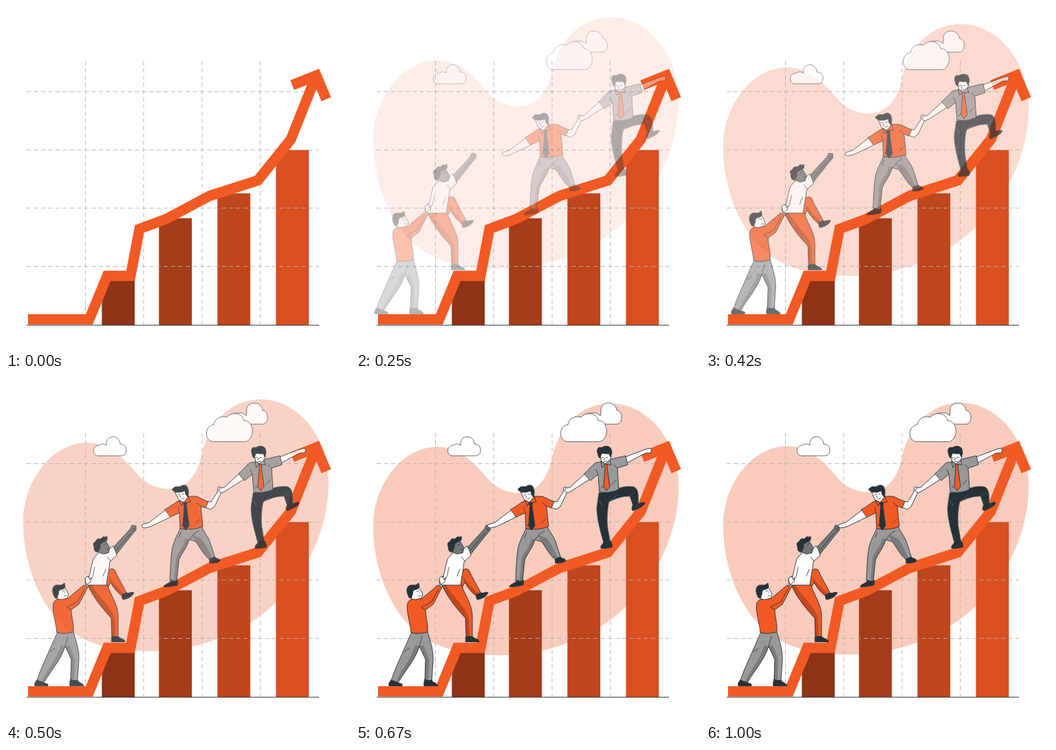
An HTML page that plays this animation: 500x500 px, repeating every 1040 ms.

```html
<!DOCTYPE html>
<html lang="en">
<head>
<meta charset="utf-8">
<title>Climbing the growth chart</title>
<style>
  html, body { margin: 0; width: 100%; height: 100%; overflow: hidden; background: #fff; }
  svg { display: block; width: 100%; height: 100%; }
  .ink { stroke: #263238; stroke-width: .9; stroke-linejoin: round; stroke-linecap: round; }
  .o { fill: #f15a24; }
  .g { fill: #999; }
  .w { fill: #fff; }
  .d { fill: #263238; }
  .s { fill: #737678; }
  .n { fill: none; stroke-width: .8; }
  .sh { fill: #000; fill-opacity: .2; stroke: none; }
  .m { stroke: #6b767b; stroke-width: .6; }
</style>
</head>
<body>
<svg viewBox="0 0 500 500">
  <path id="blob" fill="#f9cbbc" d="M25 218C25 157 67 102 118 102C150 102 172 125 192 149C205 163 220 169 236 169C262 169 277 150 284 122C293 75 325 39 370 39C425 39 469 95 469 158C469 228 438 287 398 328C353 377 280 405 212 405C160 405 107 397 72 356C42 321 25 268 25 218Z"/>

  <g id="clouds" class="ink w" style="stroke-width:.7">
    <path d="M141 113C133 112 133 98 143 98C146 95 152 95 154 98C152 82 173 81 174 96C185 95 186 112 177 113Z"/>
    <path d="M340 67C328 65 333 49 346 51C351 50 355 52 357 55L358 49C355 33 380 32 381 47C391 48 390 66 382 67Z"/>
    <path d="M309 92.5C296 92 296 69 310 68C311 59 321 54 329 57C337 48 352 51 354 62C369 61 371 90 356 92.5Z"/>
  </g>

  <path fill="#8f3318" d="M139.300 396h47.800v68h-47.800z"/>
  <path fill="#a63c19" d="M222.300 308.500h47.800V464h-47.800z"/>
  <path fill="#c0461e" d="M307.300 272.200h47.800V464h-47.800z"/>
  <path fill="#d84f20" d="M392.400 209.200h47.800V464h-47.800z"/>
  <path fill="none" stroke="#b3b3b3" stroke-width=".9" stroke-dasharray="6 4.500" d="M30 124.500H455M30 209.200H455M30 293.800H455M30 378.500H455M115.500 80V463M200 80V463M285 80V463M369.500 80V463"/>
  <path stroke="#263238" d="M30 464H455"/>
  <path fill="none" stroke="#f15a24" stroke-width="15" stroke-miterlimit="6" d="M32 455.500H121L147 392.200H181L194 324L233 309.500L296 276L366 253.500L414 194L449 106M416 115L451 101L465.500 135.500"/>

  <g id="left" class="ink">
    <!-- helper at the bottom -->
    <path class="g" d="M83 370L106 369C110 382 115 398 114 410L112 440H102L103 409L94 390C88 410 74 424 63 443L53 440C58 424 66 408 71 396Z"/>
    <path class="sh" d="M94 390L103 409L102 439H107L108 409L100 388ZM94 390C88 410 74 424 63 443L59 442C70 421 82 408 88 388Z"/>
    <path class="n" d="M94 390L98 376M72 398L79 393"/>
    <path class="d" d="M53 439L61 442L69 445V447.500H50C49 444 51 441 53 439ZM102 438C105 440 108 440 112 439C113 443 120 443 121 447.500H101C100 444 101 441 102 438Z"/>
    <path class="w" d="M124 302L123 295L126 289L129 288L131 291L133 291L131 299L127 304Z"/>
    <path class="o" d="M80 323L87 320L97 321L121 301L127 304L114 329L103 337C103 348 107 356 106 369Q94 373 82 370C81 355 74 338 77 327Z"/>
    <path class="n" d="M97 333L112 325L122 307M97 333L103 337"/>
    <path class="w" d="M83 321L82 310L93 304L97 310L99 315L97 320L89 322Z"/>
    <path class="d" d="M79 319C75 312 74 303 81 301L89 301L93 298L94 304C92 308 87 307 85 309L84 315L82 320Z"/>
    <path class="n" d="M90 310l3-.8M93 317l3-.5M94 311v.8"/>

    <!-- climber -->
    <path class="o" d="M150 301L154 284Q160 274 166 279C171 291 178 301 183 312L177 317C169 311 164 304 160 297L156 305Z"/>
    <path class="sh" d="M159 296L157 287L166 300L180 314L177 317C169 311 164 304 160 297Z"/>
    <path class="o" d="M127 301L155 300C160 315 171 330 171 345V377H162L161 349C150 337 136 321 127 301Z"/>
    <path class="sh" d="M127 301L133 301C141 316 164 335 166 350L167 377H162L161 349C150 337 136 321 127 301Z"/>
    <path class="d" d="M162 376L171 375.500C173 379 181 379 181 383.500H161.500ZM177 315L183 312C187 314 190 310 194 312C192 317 186 321 178 322C176 319 177 317 177 315Z"/>
    <path class="s" d="M161 248L166 244L189 219L191 214L197 215L197 221L191 228L168 257Z"/>
    <path class="n" d="M168 251L189 226M192 219l3-1M192 222l3-1"/>
    <path class="w" d="M143 254L152 255L163 244C166 248 168 253 169 258L159 267C158 280 155 290 154 301H125C130 289 131 276 135 263Z"/>
    <path class="n" d="M155 260L160 266M137 275L134 289L128 297M153 278L149 288"/>
    <path class="s" d="M142 251L143 241L153 237L159 247L157 254L149 256Z"/>
    <path class="d" d="M138 252C135 249 137 245 135 242C135 238 139 239 140 235C143 232 145 236 148 232C150 229 152 233 155 230C155 233 156 236 153 237C149 237 149 240 145 241L145 246L142 253Z"/>
    <path class="n" d="M150 243l3-2M154 250l3-2"/>
    <path class="w" d="M124 297L123 291L127 288L130 293L132 290L131 296L126 300Z"/>
  </g>

  <g id="right" class="ink">
    <!-- man offering his hand -->
    <path class="g" d="M245 219L276 216C280 224 285 230 288 237L296 262L289 265C280 258 275 248 268 238L258 235C255 248 244 258 243 267L240 296L230 294C231 278 231 261 234 245C237 235 241 228 245 219Z"/>
    <path class="sh" d="M258 235C255 248 244 258 243 267L240 296L236 295L239 262C243 250 252 244 253 233ZM262 228L275 233C282 241 287 251 292 264L289 265C280 258 275 248 268 238Z"/>
    <path class="n" d="M258 235L266 226L272 222M246 224L243 232"/>
    <path class="d" d="M232 294C236 296 239 296 242 294L241 301C235 302 229 304 221 303.500C222 299 230 299 232 294ZM288 263L295 260C298 263 303 262 303 266C298 269 293 269 288 269Z"/>
    <path class="w" d="M225 191L200 210L190 213L189 216L193 218L202 216L231 202ZM283 179L290 180L299 166L300 159L303 158L308 163L304 168L295 187L289 191L282 188Z"/>
    <path class="o" d="M223 191C231 187 237 181 244 178L252 175L258 172L269 172L286 180L282 189L275 186L278 216Q262 222 245 219L244 196L231 202Z"/>
    <path class="n" d="M244 196L242 188M275 186L269 181M274 205L268 211M247 214l5-3"/>
    <path class="d" d="M248 180L255 180L254 185L258 215L253 221L249 215L251 186Z"/>
    <path class="w" d="M238 166L243 163L254 163L257 171L256 177L250 181L243 177Z"/>
    <path class="o" d="M244 178L250 181L247 186ZM250 181L257 172L260 180Z"/>
    <path class="d" d="M234 161L238 158L245 158C249 154 256 156 256 160C258 165 257 169 256 173L253 169L252 164L246 166L238 166L234 163Z"/>
    <path class="n" d="M242 170l2.500-.6M248 169l2.500-.8M245 171l.5 3M247 176l4-1.500"/>

    <!-- leader -->
    <path class="d m" d="M351 167L380 160C388 157 397 157 402 158C410 162 408 172 409 183L401 187L396 172C385 172 376 175 366 180C363 192 363 208 364 217L368 240H358C353 223 347 201 348 187Z"/>
    <path class="n m" d="M366 180L378 170M352 178L356 186M396 172L402 167"/>
    <path class="d" d="M358 239L368 237C370 240 371 243 370 246C364 247 360 248 354 247.500C353 243 357 242 358 239ZM400 186L407 182C411 184 414 179 418 181.500C417 186 408 190 401 193C398 192 399 188 400 186Z"/>
    <path class="w" d="M332 138L309 159L303 160L301 164L305 167L310 165L338 147ZM389 115L418 104L425 102L428 104L426 109L419 109L391 124Z"/>
    <path class="g" d="M330 139C337 133 342 126 347 123L355 122L369 118L390 113L393 126L378 131L380 162Q367 168 352 166L350 140L339 149Z"/>
    <path class="n" d="M350 140L347 133M378 131L373 126M376 148L370 155M354 160l5-4"/>
    <path class="w" d="M353 110L366 109L369 115L366 122L360 125L355 121Z"/>
    <path class="o" d="M358 125L364 124L363 129L367 158L362 164L358 158L360 130Z"/>
    <path class="g" d="M354 121L360 125L356 130ZM360 125L367 119L369 126Z"/>
    <path class="d" d="M351 115C349 109 347 104 351 101L356 101C361 97 369 100 369 104C371 109 369 112 368 115L366 110L360 110L355 109L353 116Z"/>
    <path class="n" d="M355 116l2.500-.5M361 116l2.500-.7M359 116.500l-.5 3M358 122l4-1"/>
  </g>
</svg>
<script>
  const LOOP = 1040, START = 70, SETTLED = 570;
  const move = { blob: [0, 1], clouds: [1, 0], left: [1, 0], right: [-1, 0] };
  const clamp = x => Math.min(1, Math.max(0, x));

  function draw(t) {
    const p = clamp((t - START) / (SETTLED - START));
    // slide in at even speed, then drift gently out and back
    const drift = Math.sin(Math.PI * clamp((t - 595) / 440));
    const d = -33.5 + 29.5 * p + 4 * drift;
    for (const id in move) {
      const [x, y] = move[id], part = document.getElementById(id);
      part.setAttribute("transform", `translate(${x * d} ${y * d})`);
      part.setAttribute("opacity", p);
    }
  }

  const begin = performance.now();
  function tick() {
    draw((performance.now() - begin) % LOOP);
    requestAnimationFrame(tick);
  }
  tick();
</script>
</body>
</html>
```
